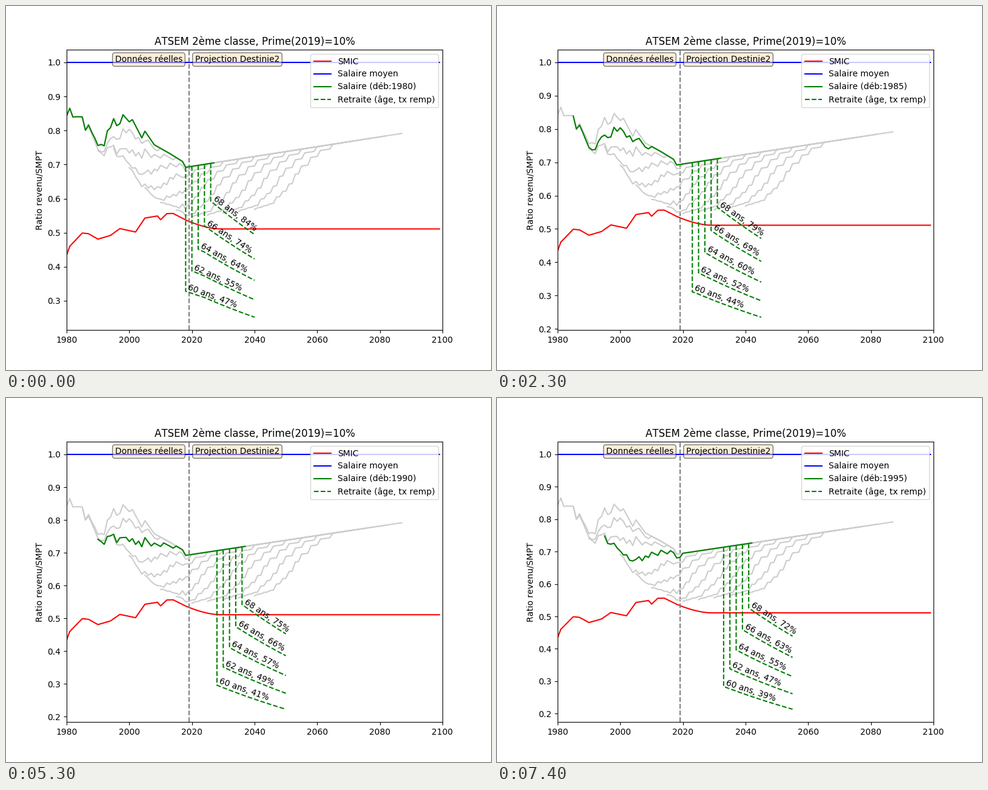
Write a matplotlib script that moves like this. It is 800 by 600 pixels and loops after 8 s.

```python
import numpy as np
import matplotlib.pyplot as plt
from matplotlib.animation import FuncAnimation

# Kerning in whole pixels
plt.rcParams["text.kerning_factor"] = 6

STARTS = range(1980, 2041, 5)
CAREER = 47
AGES = range(60, 69, 2)

# Pay grid: index of each step and the years spent in it
STEPS = np.array([330, 332, 334, 336, 346, 354, 365, 380, 392, 404, 413, 420])
STEP_ENDS = np.cumsum([1, 2, 2, 2, 2, 2, 2, 2, 3, 3, 4])

# Turning points (year, share of the average wage)
TOP_PAY = [(1980, .848), (1981, .872), (1982, .848), (1985, .858), (1986, .823),
           (1987, .842), (1990, .797), (1992, .804), (1993, .842), (1995, .874),
           (1996, .856), (1998, .874), (2001, .845), (2004, .791), (2005, .798),
           (2008, .758), (2013, .732), (2017, .709), (2018, .692), (2087, .7915)]
SMIC = [(1980, .434), (1981, .460), (1985, .499), (1987, .497), (1990, .481),
        (1994, .492), (1997, .512), (2002, .502), (2005, .543), (2009, .549),
        (2010, .538), (2012, .556), (2014, .5565), (2018, .5375)]


def between(points, years):
    return np.interp(years, *zip(*points))


def salary(start, years):
    """Top pay less the gap to the last step; the gap opened around 1992."""
    step = np.searchsorted(STEP_ENDS, years - start, side="right")
    gap = 1 - STEPS[step] / STEPS[-1]
    opening = 1 / (1 + np.exp((1992.5 - years) / 3.5))
    return between(TOP_PAY, years) * (1 - gap * opening)


def smic(years):
    decline = np.clip((2029 - years) / 11, 0, 1) ** 1.7
    return between(SMIC, years) - 0.0265 * (1 - decline)


def wage_level(years):
    slow = np.minimum(years - 2024, 0)
    fast = np.maximum(years - 2024, 0)
    return 1.0097 ** slow * 1.013 ** fast


def replacement(start, age):
    """Pension as a percentage of the last salary."""
    k, n = (start - 1980) / 5, (age - 60) / 2
    base = 47.4 - 3.15 * k + 0.2 * k * k
    return base + (8.1 * n + 0.28 * n * n) * (1 - 0.058 * k + 0.007 * k * k)


def plot_career(start, **style):
    years = np.arange(start, start + CAREER + 1)
    ax.plot(years, salary(start, years), **style)


def plot_pension(start, age, label):
    years = np.arange(start + age - 22, start + 61)
    pay = salary(start, years[0])
    level = wage_level(years)
    pension = replacement(start, age) / 100 * pay * level[0] / level
    ax.plot([years[0], *years], [pay, *pension], "g--", label=label)
    return (years[0], pension[0]), (years[-1], pension[-1])


def label_pension(begin, end, text):
    dx, dy = np.subtract(*ax.transData.transform([end, begin]))
    ax.annotate(text, begin, xytext=(1, 0), textcoords="offset points",
                rotation=np.degrees(np.arctan2(dy, dx)),
                rotation_mode="anchor", ha="left", va="bottom")


def draw(k):
    start = 1980 + 5 * ((k + 5) // 6)
    ax.clear()
    years = np.arange(1980, 2100)
    ax.plot(years, smic(years), "r", label="SMIC")
    ax.plot(years, np.ones(len(years)), "b", label="Salaire moyen")
    ax.axvline(2019, color="grey", linestyle="dashed")
    for other in STARTS:
        plot_career(other, color="0.8")
    plot_career(start, color="g", label=f"Salaire (déb:{start})")

    ends = [plot_pension(start, age, "Retraite (âge, tx remp)" if age == 60 else None)
            for age in AGES]
    ax.set_xlim(1980, 2100)
    ax.autoscale_view(scalex=False)
    for age, (begin, end) in zip(AGES, ends):
        label_pension(begin, end, f"{age} ans, {int(replacement(start, age))}%")

    box = dict(boxstyle="round", facecolor="wheat", alpha=0.5)
    for x, side, text in ((2017, "right", "Données réelles"),
                          (2021, "left", "Projection Destinie2")):
        ax.text(x, 0.98, text, transform=ax.get_xaxis_transform(),
                ha=side, va="top", bbox=box)
    ax.set_title("ATSEM 2ème classe, Prime(2019)=10%")
    ax.set_ylabel("Ratio revenu/SMPT")
    ax.legend(loc="upper right")


fig, ax = plt.subplots(figsize=(8, 6), dpi=100)
anim = FuncAnimation(fig, draw, frames=16, interval=500, init_func=lambda: draw(0),
                     repeat=True, repeat_delay=0)
plt.show()
```
